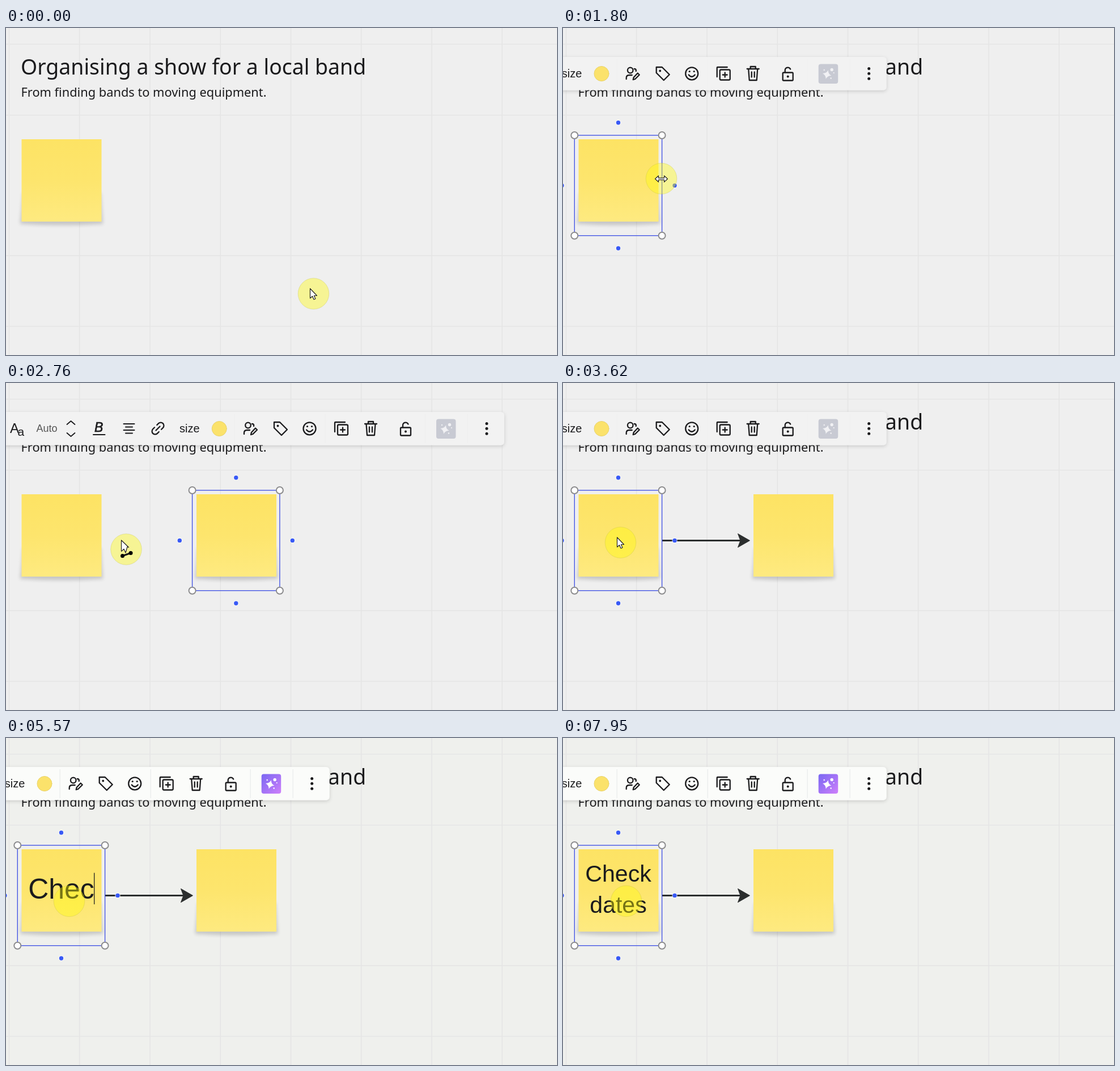
Animation, 972 px wide and 576 px high, one loop 8000 ms. Source, as an HTML page:

```html
<!DOCTYPE html>
<html lang="en">
<head>
<meta charset="utf-8">
<title>Whiteboard flow</title>
<style>
  html, body { margin: 0; width: 100%; height: 100%; overflow: hidden; background: #efefef; }
  svg { display: block; width: 100vw; height: 100vh; }
  .heading { font-family: "Noto Sans", sans-serif; fill: #1b1b1d; }
  .ui { font-family: "Liberation Sans", Arial, sans-serif; fill: #1b1b1d; }
  .icon { fill: none; stroke: #1b1b1d; stroke-width: 2.3; stroke-linecap: round; stroke-linejoin: round; }
  .solid { fill: #1b1b1d; stroke: none; }
  .pointer { fill: #fff; stroke: #222; stroke-width: 1.2; stroke-linejoin: round; }
  .dots circle { fill: #3859f5; stroke: #fff; stroke-opacity: .75; stroke-width: 2; paint-order: stroke; }
  .handles circle { fill: #fff; stroke: #8b8b8d; stroke-width: 2; }
  #grid { fill: none; stroke: #e5e5e5; stroke-width: 1.6; }
</style>
</head>
<body>
<svg viewBox="0 0 972 576" preserveAspectRatio="none">
  <defs>
    <linearGradient id="paper" x1="0" y1="0" x2="0" y2="1">
      <stop offset="0" stop-color="#fde364"/>
      <stop offset=".5" stop-color="#fde56d"/>
      <stop offset="1" stop-color="#feea80"/>
    </linearGradient>
    <linearGradient id="violet" x1="0" y1="0" x2="1" y2="1">
      <stop offset="0" stop-color="#7a68f2"/>
      <stop offset=".5" stop-color="#a373f6"/>
      <stop offset="1" stop-color="#cf80fb"/>
    </linearGradient>
    <filter id="blur" x="-20%" y="-20%" width="140%" height="140%"><feGaussianBlur stdDeviation="3"/></filter>
    <filter id="lift" x="-5%" y="-40%" width="110%" height="190%">
      <feDropShadow dx="0" dy="2" stdDeviation="3" flood-color="#000" flood-opacity=".16"/>
    </filter>
    <g id="note">
      <path d="M30 290 L25 345 Q98 350 171 345 L167 290Z" fill="#000" opacity=".17" filter="url(#blur)"/>
      <rect x="27.5" y="196" width="141" height="145" fill="url(#paper)"/>
    </g>
  </defs>

  <rect id="board" width="972" height="576" fill="#efefef"/>
  <path id="grid"/>

  <text class="heading" x="26.1" y="82" font-size="37.4">Organising a show for a local band</text>
  <text class="heading" x="26.5" y="121" font-size="21.8">From finding bands to moving equipment.</text>

  <use href="#note"/>
  <use id="second" href="#note" x="308.5"/>
  <g id="link">
    <path d="M175 277.5H314" stroke="#2b2e2e" stroke-width="3"/>
    <path d="M329.5 277.5L308.5 265.5L313 277.5L308.5 289.5Z" fill="#2b2e2e" stroke="#2b2e2e" stroke-linejoin="round"/>
  </g>

  <g id="selection">
    <rect x="20.3" y="189" width="154.3" height="176.7" fill="none" stroke="#4657e4" stroke-width="1.4"/>
    <g class="handles">
      <circle cx="20.3" cy="189" r="6"/><circle cx="174.6" cy="189" r="6"/>
      <circle cx="20.3" cy="365.7" r="6"/><circle cx="174.6" cy="365.7" r="6"/>
    </g>
    <g class="dots">
      <circle cx="97.5" cy="166.7" r="3.7"/><circle cx="97.5" cy="388" r="3.7"/>
      <circle cx="-2" cy="277.4" r="3.7"/><circle id="port" cx="197" cy="277.4" r="3.7"/>
    </g>
  </g>

  <g class="ui" text-anchor="middle">
    <text id="line1" x="97.5"/>
    <text id="line2" x="97.5" y="308" font-size="41"/>
  </g>
  <rect id="caret" width="1.3" fill="#222"/>

  <g id="toolbar">
    <rect id="bar" x="-340" y="51" width="1219" height="58.5" rx="6" filter="url(#lift)"/>
    <path id="rules" d="M403.5 55V106M563.5 55V106M739.5 55V106M814.5 55V106" stroke="#eceded" stroke-width="1.4"/>
    <g class="ui">
      <text x="7" y="88" font-size="24">A</text><text x="20.5" y="92.5" font-size="21">a</text>
      <text x="53.5" y="86" font-size="18" fill="#555">Auto</text>
      <text x="156" y="86" font-size="23" font-style="italic" stroke="#1b1b1d" stroke-width=".7">B</text>
      <text x="306" y="87" font-size="20">size</text>
    </g>
    <g class="icon">
      <path d="M107.5 73L114.5 67L121.5 73M107.5 88L114.5 94L121.5 88" stroke-width="1.8"/>
      <path d="M154 91H174.500M207.500 72H226.500M211 77.500H223M207.500 83H226.500M211 88.500H223" stroke-width="2"/>
      <g transform="translate(268 80) rotate(-45)">
        <path d="M-3 5.500H-7A5.500 5.500 0 0 1-7-5.500H-3M3-5.500H7A5.500 5.500 0 0 1 7 5.500H3M-5 0H5"/>
      </g>
      <circle cx="376.300" cy="80.500" r="13" fill="#fbe26b" stroke="#e9d36b" stroke-width="1"/>
      <circle cx="427" cy="74.500" r="4.800"/>
      <path d="M420 90V88Q420 83 425 83H430M432 91L433 87L440 79.500L443 82.500L435.500 90ZM434 72Q438 72 437 76"/>
      <path d="M473 69H483L496 82L486 92L473 79Z"/><circle cx="479.500" cy="75.500" r="1.900" class="solid"/>
      <circle cx="535.500" cy="80.300" r="11"/>
      <path d="M530 82.500Q535.500 89 541 82.500"/>
      <circle cx="531.500" cy="76.500" r="1.600" class="solid"/><circle cx="539.500" cy="76.500" r="1.600" class="solid"/>
      <path d="M580 86V70Q580 69 581 69H598"/>
      <rect x="585" y="73.500" width="18" height="18" rx="2"/>
      <path d="M594 78.500V86.500M590 82.500H598"/>
      <path d="M633 72H654M639 72V68H648V72M635.500 72L637 92H650L651.500 72M641 77.500V86.500M646 77.500V86.500"/>
      <rect x="696" y="78.500" width="18" height="14" rx="1.500"/>
      <path d="M700 78V74A5 5 0 0 1 709.500 72.500"/><circle cx="705" cy="85.500" r="2" class="solid"/>
      <g class="solid"><circle cx="848" cy="71.500" r="2.500"/><circle cx="848" cy="80.300" r="2.500"/><circle cx="848" cy="89.200" r="2.500"/></g>
    </g>
    <rect id="magic" x="759" y="63.500" width="34.500" height="34.500" rx="4"/>
    <g fill="#fff" id="sparkle">
      <path d="M774 74Q775.500 80.500 782 82Q775.500 83.500 774 90Q772.500 83.500 766 82Q772.500 80.500 774 74Z" transform="rotate(15 774 82)"/>
      <circle cx="782.500" cy="73.500" r="2.700"/><circle cx="786" cy="79" r="1.100"/><circle cx="769" cy="74" r="1.200"/><circle cx="781" cy="88.500" r="1.300"/>
    </g>
  </g>

  <g id="cursor">
    <circle r="27.300" fill="rgb(255,250,10)" fill-opacity=".4" stroke="#b9b93c" stroke-opacity=".3"/>
    <path id="arrow" class="pointer" d="M-6-9V8L-2 4.500L.6 10.300L3.400 9L.9 3.500H6Z"/>
    <g id="connect">
      <path class="pointer" stroke="#555" d="M-8.500-16V3.500L-4-.5L-1 6L2-4.500L4.500-3.500Z"/>
      <path d="M-6.500 11.500L8 6.500" stroke="#161616" stroke-width="3"/>
      <circle cx="-6.500" cy="11.500" r="3.500"/><circle cx="8" cy="6.500" r="3.500"/>
    </g>
    <path id="resize" class="pointer" d="M-11 .5L-5-5V-1H5V-5L11 .5L5 6V2H-5V6Z"/>
    <path id="beam" d="M-3-7.500Q0-7.500 0-6Q0-7.500 3-7.500M0-6V7M-3 8.500Q0 8.500 0 7Q0 8.500 3 8.500" fill="none" stroke="#333" stroke-width="1.200"/>
  </g>
</svg>
<script>
const LOOP = 8000, CX = 97.5;
const $ = id => document.getElementById(id);
const show = (id, on) => { $(id).style.display = on ? '' : 'none'; };
const set = (id, attrs) => { for (const k in attrs) $(id).setAttribute(k, attrs[k]); };

// Pointer moves: start, end, visible steps, target x, target y
const moves = [
  [240, 960, 7, 158.5, 277.5], [1080, 1200, 2, 158, 277.5],
  [1500, 1800, 5, 173.5, 265.3], [1860, 2040, 4, 212, 293],
  [3190, 3310, 3, 101.5, 281], [3740, 3920, 3, 98, 272],
  [4970, 5150, 3, 111.5, 287.3]
];
const shapes = [[0, 'arrow'], [1740, 'resize'], [1920, 'arrow'], [2040, 'connect'],
  [3190, 'arrow'], [3920, 'beam'], [5090, '']];
const typed = [[0, ''], [5150, 'C'], [5270, 'Ch'], [5390, 'Che'], [5570, 'Chec'], [5880, 'Check'],
  [6000, 'Check d'], [6370, 'Check dq'], [6430, 'Check dqt'], [6920, 'Check d'],
  [7100, 'Check da'], [7280, 'Check dat'], [7460, 'Check date'], [7950, 'Check dates']];

const at = (track, t) => track.filter(k => k[0] <= t).pop()[1];
const ease = p => (1 - Math.cos(Math.PI * p)) / 2;

function pointerAt(t) {
  let x = 542.5, y = 468;
  for (const [start, end, steps, tx, ty] of moves) {
    if (t < start) break;
    const done = Math.floor((t - start) * (steps - 1) / (end - start) + 1e-6) + 1;
    const p = ease(Math.min(1, done / steps));
    x += (tx - x) * p;
    y += (ty - y) * p;
  }
  return `translate(${x} ${y})`;
}

function drawText(t) {
  const [first, second = ''] = at(typed, t).split(' ');
  const widths = { C: .722, h: .556, e: .556, c: .5, k: .5 };
  const ems = [...first].reduce((sum, ch) => sum + widths[ch], 0);
  const size = Math.min(85, 116.5 / (ems || 1));
  const base = second ? 252.5 : 265.5 + size * .35;
  $('line1').textContent = first;
  $('line2').textContent = second;
  set('line1', { y: base, 'font-size': size });
  const caretOn = first && t < 7950;
  show('caret', caretOn);
  if (!caretOn) return;
  const half = $(second ? 'line2' : 'line1').getComputedTextLength() / 2;
  set('caret', { x: CX + half - .7, y: (second ? 308 : base) - size * .91, height: size * 1.11 });
}

function drawGrid(late) {
  let d = '';
  for (let i = 0; i < 8; i++) d += `M${5.5 + i * 124.25} 0V576`;
  for (const y of [28.5, 153.5, 401, 525.5]) d += `M0 ${y}H972`;
  set('grid', { d, 'stroke-width': late ? 2.6 : 1.6, stroke: late ? '#e8e9e6' : '#e4e4e4' });
}

function draw(t) {
  const late = t >= 3860, right = t >= 2760 && t < 3620;
  const shift = right ? 308.3 : 0;
  set('board', { fill: late ? '#eff0ed' : '#efefef' });
  drawGrid(late);
  show('second', t >= 2760);
  show('link', t >= 2880);
  show('selection', t >= 1440);
  set('selection', { transform: `translate(${shift})` });
  show('toolbar', t >= 1500);
  set('toolbar', { transform: `translate(${shift - 308.3})` });
  set('bar', { fill: late ? '#fbfcfa' : '#f2f2f2' });
  set('rules', { opacity: late ? 1 : .4 });
  const active = t >= 5150;
  set('magic', { fill: active ? 'url(#violet)' : '#c8cad3' });
  set('sparkle', { opacity: active ? 1 : .75 });

  const hover = t >= 2280 && t < 2760 ? Math.min(1, (Math.floor((t - 2280) / 120) + 1) / 3) : 0;
  set('port', { cx: 197 + 6 * hover, r: 3.7 + 5.8 * hover });

  drawText(t);
  set('cursor', { transform: pointerAt(t) });
  const shape = at(shapes, t);
  for (const id of ['arrow', 'connect', 'resize', 'beam']) show(id, id === shape);
}

const start = performance.now();
(function tick() {
  draw((performance.now() - start) % LOOP);
  requestAnimationFrame(tick);
})();
</script>
</body>
</html>
```
